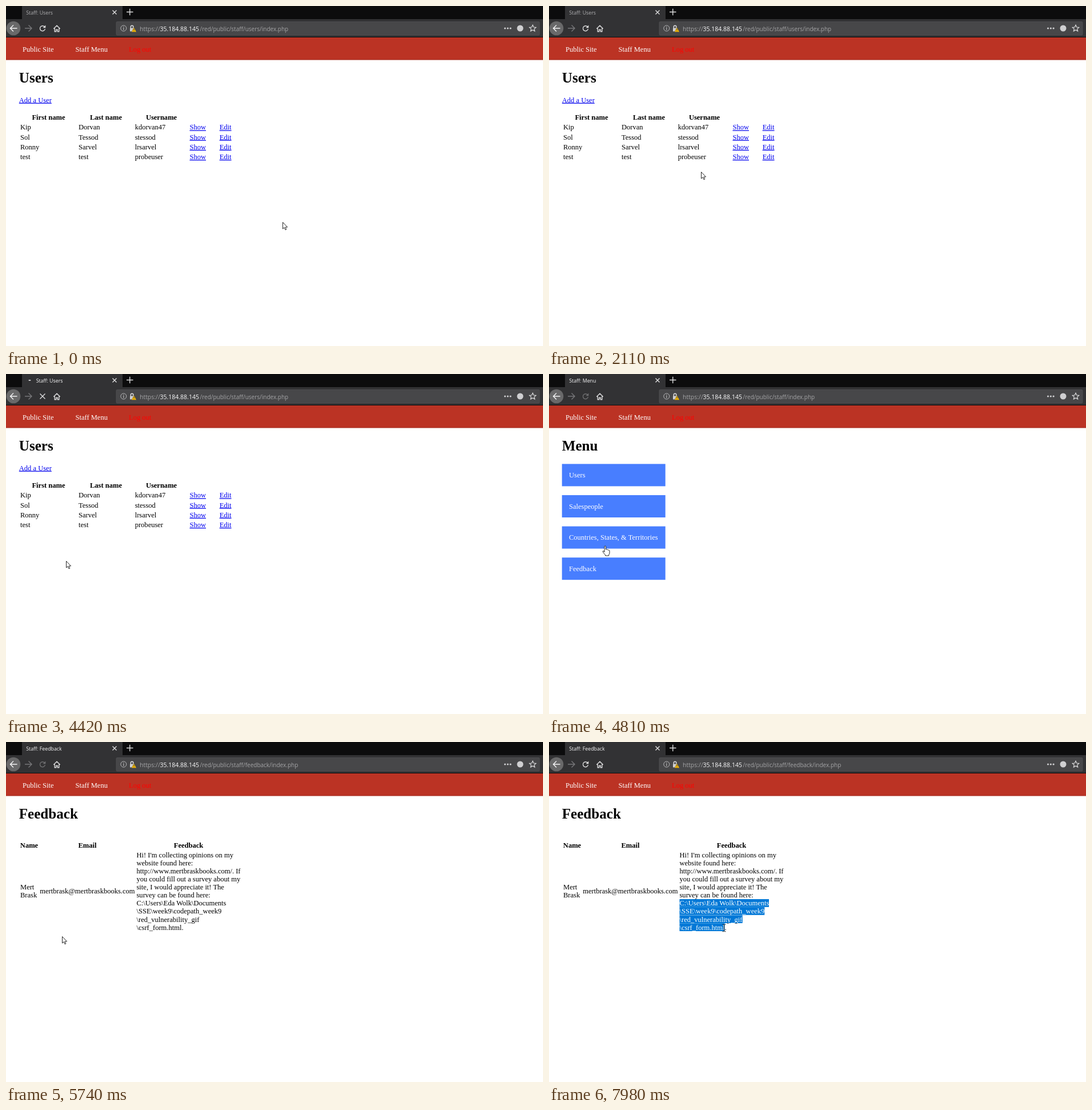
An HTML page that plays this animation: 940 by 595 pixels, repeating every 8 s.

```html
<!DOCTYPE html>
<html lang="en">
<head>
<meta charset="utf-8">
<title>Staff</title>
<style>
  html, body { margin: 0; width: 100%; height: 100%; overflow: hidden; background: #fff; }
  svg { display: block; width: 100vw; height: 100vh; }
  .ui { font-family: "Open Sans", "Noto Sans", sans-serif; }
  .page { font: 12.53px "Liberation Serif", "Times New Roman", serif; }
  .page text, .ui text { white-space: pre; }
  .h1 { font-size: 25.07px; font-weight: bold; }
  .th { font-weight: bold; text-anchor: middle; }
  .link { fill: #00e; text-decoration: underline; }
  .light { fill: #fff; }
  .line { fill: none; stroke: #dededf; stroke-width: 1.4; }
</style>
</head>
<body>
<svg viewBox="0 0 940 595" preserveAspectRatio="none">
  <rect width="940" height="595" fill="#fff"/>

  <g class="ui">
    <rect width="940" height="55" fill="#0c0c0d"/>
    <path d="M28 0H204V23H940V54H0V23H28z" fill="#323234"/>
    <text id="title" y="15" font-size="8.8"></text>
    <rect id="throbber" y="10" height="2" rx="1" fill="#c8c8ca"/>
    <path class="line" d="M186.5 7.5l7 7m0-7l-7 7M211 10.5h11.500m-5.750-5.750v11.500"/>

    <circle cx="13" cy="39" r="12.300" fill="#69696a"/>
    <path class="line" d="M19.500 39H7.500m5.500-5.500L7.500 39l5.500 5.500" style="stroke:#f4f4f5"/>
    <path class="line" d="M33 39h12m-5.500-5.500L45 39l-5.500 5.500" style="stroke:#77777a"/>
    <g id="reload">
      <path class="line" d="M67.300 36.200A4.500 4.500 0 1 0 68.400 40"/>
      <path d="M69.300 33.500v4.800h-4.800z" fill="#dededf"/>
    </g>
    <path id="stop" class="line"/>
    <path class="line" d="M83.300 39.800L89 34.200l5.700 5.600M85.200 39v5.800h2.500v-3.300h2.600v3.300h2.500V39"/>

    <rect x="193" y="27.500" width="741" height="23.500" rx="1.500" fill="#474749" stroke="#545456" stroke-width=".7"/>
    <circle class="line" cx="205.800" cy="39" r="5" style="stroke-width:1;stroke:#b8b8ba"/>
    <path class="line" d="M205.800 38v4m0-6v1.200" style="stroke-width:1.200;stroke:#b8b8ba"/>
    <path class="line" d="M218.300 39v-2.400a2.300 2.300 0 0 1 4.600 0V39"/>
    <rect x="217" y="38.500" width="7.500" height="6" rx=".8" fill="#d0d0d2"/>
    <path d="M224 37.500l4.300 8h-8.600z" fill="#ffbf00" stroke="#474749" stroke-width=".5"/>
    <path d="M224 40v2.700m0 .8v1" stroke="#333" stroke-width=".9"/>
    <g fill="#a4a4a6">
      <text x="234" y="43.500" font-size="10.500">https://</text>
      <text x="269.500" y="43.500" font-size="10.500" fill="#f9f9fa">35.184.88.145</text>
      <text id="path" x="339.500" y="43.500" font-size="10"></text>
    </g>
    <g fill="#cfcfd1">
      <circle cx="873.500" cy="39" r="1.600"/><circle cx="878.300" cy="39" r="1.600"/><circle cx="883.100" cy="39" r="1.600"/>
      <circle cx="900" cy="39" r="5.500"/>
    </g>
    <path class="line" d="M922 33.300l1.700 3.700 4 .4-3 2.700.9 4-3.600-2.100-3.600 2.100.9-4-3-2.700 4-.4z" style="stroke-width:1.200"/>
  </g>

  <g class="page">
    <rect y="55" width="940" height="39.300" fill="#bb3324"/>
    <rect y="93.300" width="940" height="1" fill="#a32b1e"/>
    <g class="light">
      <text x="29" y="80.400">Public Site</text>
      <text x="121.500" y="80.400">Staff Menu</text>
      <text x="215" y="80.400" style="fill:#f00">Log out</text>
    </g>
    <text id="heading" class="h1" x="22.800" y="134.300"></text>
    <g id="Users"></g>
    <g id="Menu"></g>
    <g id="Feedback"></g>
  </g>

  <g id="pointer">
    <path id="arrow" d="M.5 .5V12l2.700-2.400 1.800 4.200 1.800-.8L5 9h3.600z" fill="#fff" stroke="#111" stroke-width=".9"/>
    <path id="hand" d="M3.600 11V1.800q0-1.300 1.200-1.300t1.200 1.300V6.500q2-.8 2.400.6 1.800-.5 2.200.8 1.900-.3 1.900 1.400v3.200q0 2-1.300 3.200v1.800H5v-1.400Q2 13 .8 10.600 .3 9.200 1.600 9.100 2.600 9.200 3.600 11z" fill="#fff" stroke="#111" stroke-width=".9"/>
    <path id="beam" d="M.5 .5h2.200l.8.7.8-.7h2.200M3.500 1.200v11.100M.5 13h2.200l.8-.7.8.7h2.200" fill="none" stroke="#111" stroke-width=".9"/>
  </g>
</svg>

<script>
const LOOP = 8000;
const $ = id => document.getElementById(id);
const text = (x, y, str, cls = '') =>
  `<text x="${x}" y="${y}" class="${cls}">${str.replace(/&/g, '&amp;')}</text>`;

// Users page
const people = [
  ['Kip', 'Dorvan', 'kdorvan47'],
  ['Sol', 'Tessod', 'stessod'],
  ['Ronny', 'Sarvel', 'lrsarvel'],
  ['test', 'test', 'probeuser']
];
$('Users').innerHTML = text(22.8, 168.6, 'Add a User', 'link') +
  text(74.5, 199, 'First name', 'th') + text(175, 199, 'Last name', 'th') + text(272, 199, 'Username', 'th') +
  people.map(([first, last, user], i) => {
    const y = 216.3 + i * 17.23;
    return text(25, y, first) + text(127, y, last) + text(225.7, y, user) +
      text(321.5, y, 'Show', 'link') + text(373.7, y, 'Edit', 'link');
  }).join('');

// Menu page
$('Menu').innerHTML = ['Users', 'Salespeople', 'Countries, States, & Territories', 'Feedback'].map((label, i) => {
  const y = 157.4 + i * 54.6;
  return `<rect x="22.7" y="${y}" width="181" height="39" fill="#487eff"/>` + text(35, y + 23.7, label, 'light');
}).join('');
const feedbackButton = $('Menu').querySelector('rect:last-of-type');

// Feedback page
const message = [
  'Hi! I\'m collecting opinions on my', 'website found here:',
  'http://www.mertbraskbooks.com/. If', 'you could fill out a survey about my',
  'site, I would appreciate it! The', 'survey can be found here:',
  'C:\\Users\\Eda Wolk\\Documents', '\\SSE\\week9\\codepath_week9',
  '\\red_vulnerability_gif', '\\csrf_form.html.'
];
const LEFT = 228.5, LEADING = 14.07;
const messageLine = (str, i) => text(LEFT, 202 + i * LEADING, str);
const selectionRects = [0, 1, 2, 3].map(i =>
  `<rect x="${LEFT}" y="${275 + i * LEADING}" height="13.8"/>`).join('');
$('Feedback').innerHTML =
  text(40.5, 185, 'Name', 'th') + text(142.5, 185, 'Email', 'th') + text(319.5, 185, 'Feedback', 'th') +
  text(25, 258.3, 'Mert') + text(25, 272.4, 'Brask') + text(59.3, 265.4, 'mertbrask@mertbraskbooks.com') +
  message.map(messageLine).join('') +
  `<clipPath id="selected">${selectionRects}</clipPath>
   <g clip-path="url(#selected)">
     <rect x="220" y="270" width="200" height="70" fill="#0078d7"/>
     <g class="light">${message.map((s, i) => i > 5 ? messageLine(s, i) : '').join('')}</g>
   </g>`;
const selection = [...$('selected').children];
const fullLines = [385, 377.3, 338.7];

// Timelines: each entry holds until the next one
const pointer = [
  [0, 'arrow', 484, 378], [270, 'arrow', 480, 371], [390, 'arrow', 473, 360], [510, 'arrow', 462, 344],
  [630, 'arrow', 453, 332], [780, 'arrow', 300, 324], [900, 'arrow', 168, 322], [1050, 'arrow', 80, 308],
  [1170, 'arrow', 35, 288], [1290, 'arrow', 22, 281], [1440, 'arrow', 110, 266], [1570, 'beam', 242.5, 219],
  [1730, 'arrow', 405, 232], [1870, 'arrow', 447, 252], [1990, 'arrow', 380, 296], [2110, 'arrow', 266, 290],
  [2400, 'beam', 228.5, 246], [2540, 'arrow', 205, 190], [2660, 'arrow', 150, 110], [2780, 'hand', 123.5, 80],
  [2940, 'arrow', 90, 76], [3080, 'hand', 60.5, 76], [3640, 'arrow', 95, 70], [3760, 'hand', 131, 65],
  [4180, 'arrow', 138, 140], [4300, 'arrow', 125, 250], [4420, 'arrow', 105, 327], [4570, 'arrow', 96, 360],
  [4690, 'hand', 96, 335], [4810, 'hand', 93.5, 300.5], [4940, 'arrow', 95, 308], [5080, 'hand', 90, 326],
  [5200, 'hand', 84, 340], [5320, 'hand', 78.5, 346]
].concat([
  [5740, 'arrow', 98, 340], [5860, 'arrow', 132, 322], [5980, 'arrow', 168, 305], [6100, 'arrow', 205, 290],
  [6220, 'beam', 230, 282], [6370, 'beam', 229.5, 275.5], [6670, 'beam', 229, 275.7], [7050, 'beam', 270, 291],
  [7170, 'beam', 300, 305], [7320, 'beam', 288, 318], [7440, 'beam', 306.5, 318.7], [7690, 'beam', 305.5, 318.7],
  [7980, 'beam', 303, 318.7]
]);
const pages = [[0, 'Users', 'users/'], [4690, 'Menu', ''], [5590, 'Feedback', 'feedback/']];
const loading = [
  [0, 'idle'], [4060, 'start'], [4180, 'busy'], [4690, 'done'], [5080, 'idle'],
  [5320, 'start'], [5590, 'busy'], [5740, 'done'], [6220, 'idle']
];
const selecting = [
  [0, 0, LEFT], [6790, 0, 236.8], [7050, 1, 273], [7170, 2, 303],
  [7320, 3, 291], [7440, 3, 307.6], [7690, 3, 310.8], [7980, 3, 307.6]
];
const at = (list, t) => list.findLast(entry => entry[0] <= t).slice(1);
const show = (el, on) => el.style.display = on ? '' : 'none';

function draw(t) {
  const [page, folder] = at(pages, t);
  for (const [, name] of pages) show($(name), name === page);
  $('heading').textContent = page;
  $('path').textContent = `/red/public/staff/${folder}index.php`;

  const [state] = at(loading, t);
  const active = state === 'start' || state === 'busy';
  $('title').textContent = 'Staff: ' + page;
  $('title').setAttribute('x', active ? 52.7 : 35.3);
  $('title').setAttribute('fill', t < 3910 ? '#b1b1b3' : '#f9f9fa');
  show($('throbber'), active);
  const swing = Math.sin((t - 5470) / 120);
  const width = 6 - 3 * Math.abs(swing);
  $('throbber').setAttribute('x', 44 + 4 * swing - width / 2);
  $('throbber').setAttribute('width', width);
  show($('reload'), !active);
  $('reload').setAttribute('opacity', state === 'done' ? .35 : 1);
  show($('stop'), active);
  $('stop').setAttribute('d', state === 'start' ? 'M58.5 34.500l7 6' : 'M59.500 34.500l9 9m0-9l-9 9');

  feedbackButton.setAttribute('fill', t >= 5200 ? '#3f6fe0' : '#487eff');

  const [line, end] = at(selecting, t);
  selection.forEach((rect, i) => {
    const right = i < line ? fullLines[i] : i === line ? end : LEFT;
    rect.setAttribute('width', right - LEFT);
  });

  const [shape, x, y] = at(pointer, t);
  for (const name of ['arrow', 'hand', 'beam']) show($(name), name === shape);
  $('pointer').setAttribute('transform', `translate(${x} ${y})`);
}

const start = performance.now();
function tick() {
  draw((performance.now() - start) % LOOP);
  requestAnimationFrame(tick);
}
tick();
</script>
</body>
</html>
```
